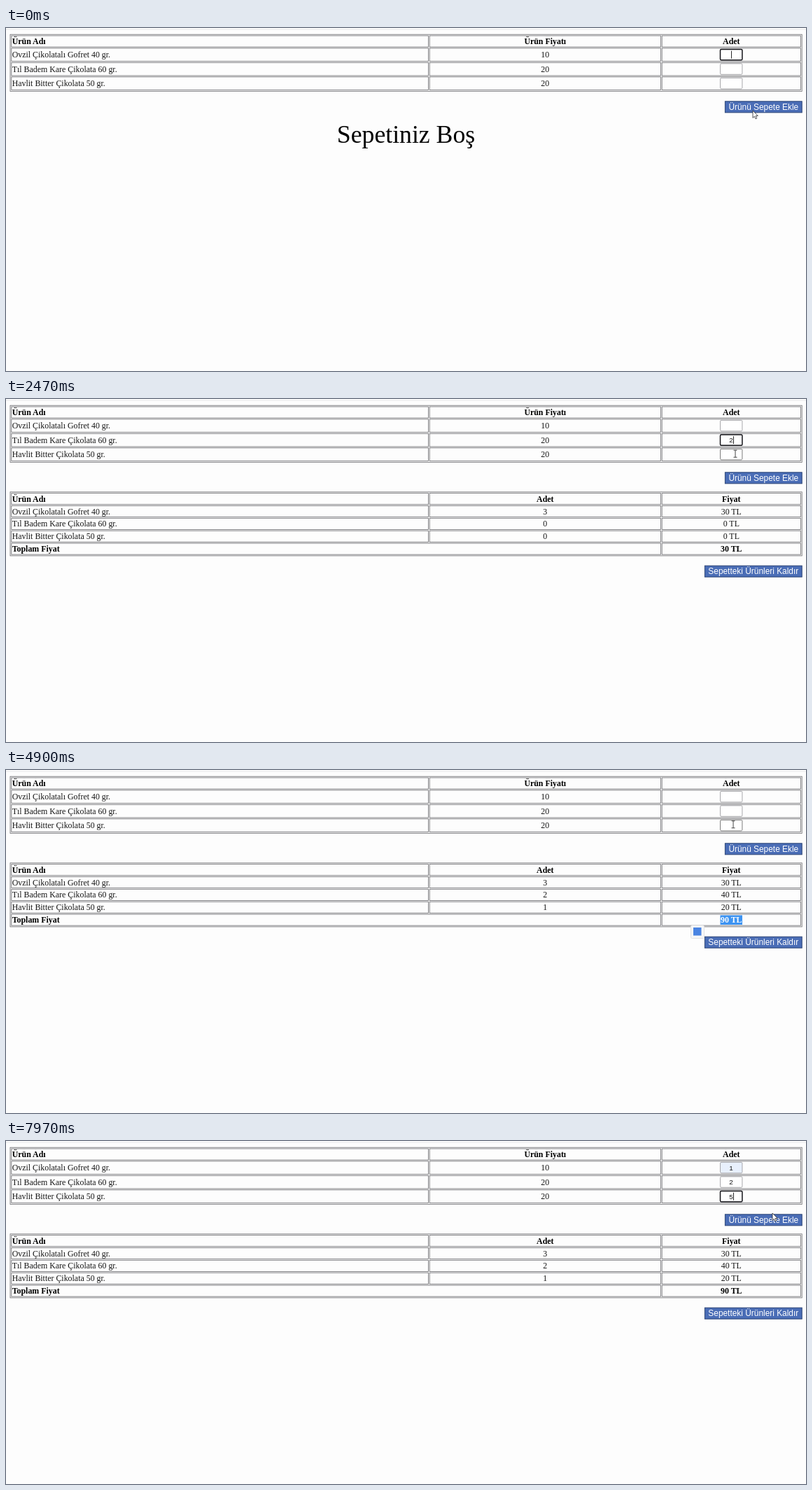
An HTML page for the animation above (8000 ms loop, 1143 px wide and 490 px high).

```html
<!DOCTYPE html>
<html lang="tr">
<head>
<meta charset="utf-8">
<title>Sepet</title>
<style>
  html, body { margin: 0; width: 100%; height: 100%; overflow: hidden; background: #fdfdfd; }
  svg { display: block; width: 1143px; height: 490px; }
  text { font: 11.9px "Liberation Serif", "Times New Roman", serif; fill: #161616; }
  .bold { font-weight: bold; fill: #000; }
  .mid { text-anchor: middle; }
  .title { font-size: 35.7px; fill: #000; }
  .label { font: 11.9px "Liberation Sans", Arial, sans-serif; fill: #fff; }
  .digit { font: 9.9px "Liberation Sans", Arial, sans-serif; }
  .line { fill: none; stroke: #68686c; stroke-width: .8; }
  .button { fill: #4a6db6; stroke: #2b4475; }
  .picked { font-weight: bold; fill: #fff; }
  .field { fill: #fff; stroke: #98989c; stroke-width: .85; }
  .field.over { stroke: #666; }
  .field.focus { stroke: #15151a; stroke-width: 1.5; }
  .field.autofill { fill: #e8f0fd; }
</style>
</head>
<body>
<svg id="stage" viewBox="0 0 1143 490"></svg>
<script>
const LOOP = 8000, BLINK = 540, MOVE = 260;
const LEFT = 6, RIGHT = 1137.2, GAP = 1.8;
const ROW = 17.87, FIELD_ROW = 20.5;
const stage = document.getElementById('stage');

function add(parent, tag, attrs = {}, content = '') {
  const node = document.createElementNS('http://www.w3.org/2000/svg', tag);
  set(node, attrs);
  node.textContent = content;
  return parent.appendChild(node);
}
function set(node, attrs) {
  for (const key in attrs) node.setAttribute(key, attrs[key]);
}
const show = (node, on) => set(node, { visibility: on ? 'inherit' : 'hidden' });
const text = (parent, x, y, content, cls = '') => add(parent, 'text', { x, y, class: cls }, content);
const box = (parent, x, y, width, height, attrs) =>
  add(parent, 'rect', { x, y, width, height, ...attrs });
const line = { class: 'line' };

const products = [
  { name: 'Ovzil Çikolatalı Gofret 40 gr.', price: 10 },
  { name: 'Tıl Badem Kare Çikolata 60 gr.', price: 20 },
  { name: 'Havlit Bitter Çikolata 50 gr.', price: 20 }
];

// Draws a bordered table; a null cell joins the one before it
function table(parent, top, bodyRow, rows) {
  const edges = [LEFT + GAP, 605.2, 937.2, RIGHT];
  let y = top + GAP;
  const drawn = rows.map((cells, r) => {
    const pitch = r ? bodyRow : ROW, height = pitch - GAP;
    const cls = r && cells[1] !== null ? '' : 'bold';
    const labels = cells.map((cell, c) => {
      if (cell === null) return null;
      const end = edges[cells[c + 1] === null ? c + 2 : c + 1] - GAP;
      box(parent, edges[c], y, end - edges[c], height, line);
      const x = c ? (edges[c] + end) / 2 : edges[c] + .9;
      return text(parent, x, y + height / 2 + 4, cell, c ? cls + ' mid' : cls);
    });
    y += pitch;
    return labels;
  });
  box(parent, LEFT, top, RIGHT - LEFT, y - top, line);
  return drawn;
}

function button(parent, x, y, label) {
  box(parent, x, y, RIGHT - x, 16, { class: 'button' });
  text(parent, (x + RIGHT) / 2, y + 12.2, label, 'label mid');
}

box(stage, 0, 1.6, 1143, .9, { fill: '#e6e6e8' });
table(stage, 9.2, FIELD_ROW, [
  ['Ürün Adı', 'Ürün Fiyatı', 'Adet'],
  ...products.map(({ name, price }) => [name, price, ''])
]);
const fields = products.map((_, i) => {
  const y = 38.1 + FIELD_ROW * i;
  return {
    y,
    frame: box(stage, 1020.5, y - 7.7, 31.4, 15.4, { rx: 1.5 }),
    digit: text(stage, 1036, y + 3.6, '', 'digit mid')
  };
});
const caret = box(stage, 0, 0, .9, 11, { fill: '#111' });
button(stage, 1027.4, 104.8, 'Ürünü Sepete Ekle');
const empty = text(stage, 571.5, 164.4, 'Sepetiniz Boş', 'title mid');

const basket = add(stage, 'g');
const basketRows = table(basket, 132.8, ROW, [
  ['Ürün Adı', 'Adet', 'Fiyat'],
  ...products.map(({ name }) => [name, '', '']),
  ['Toplam Fiyat', null, '']
]).slice(1);
button(basket, 998.4, 238.2, 'Sepetteki Ürünleri Kaldır');

// Selected total, revealed from the right
const clip = add(stage, 'clipPath', { id: 'selection' });
const clipBox = box(clip, 0, 207, 0, 15);
const selected = add(stage, 'g', { 'clip-path': 'url(#selection)' });
box(selected, 1020.5, 207.5, 31.5, 13.5, { fill: '#3c93f2' });
const selectedTotal = text(selected, 1036.3, 218.1, '', 'picked mid');
const popup = add(stage, 'g');
box(popup, 978.5, 222, 19, 18.5, { rx: 2, fill: '#f7f7f8', stroke: '#e2e2e4' });
box(popup, 982, 225, 11.5, 11.5, { fill: '#4a84e2' });

const arrow = add(stage, 'path', {
  d: 'M0 0V10.4L2.4 8.2 4 11.8 5.8 11 4.2 7.5H7.3Z',
  fill: '#fff', stroke: '#2a2a2e', 'stroke-width': .8
});
const beam = add(stage, 'path', {
  d: 'M-2.5 -5H2.5M0 -5V5M-2.5 5H2.5',
  fill: 'none', stroke: '#333', 'stroke-width': .9
});

// What the user does; a move ends at its time
const inField = (i, x = 1042) => [x, fields[i].y - .8];
const script = [
  { at: 120, type: 3 },
  { at: 500, submit: true },
  { at: 1100, to: [1118, 104] },
  { at: 1650, to: inField(1, 1045) },
  { at: 1750, click: 1 },
  { at: 2130, type: 2 },
  { at: 2480, to: inField(2), click: 2 },
  { at: 2680, type: 1 },
  { at: 3220, to: [1104, 110] },
  { at: 3430, submit: true },
  { at: 4120, to: [1056, 214] },
  { at: 4540, to: [991, 225], drag: true },
  { at: 4890, to: inField(2, 1039) },
  { at: 5060, to: inField(0), click: 0 },
  { at: 5150, type: 1 },
  { at: 5690, to: [1085, 58] },
  { at: 6110, to: inField(1), click: 1 },
  { at: 6440, type: 2 },
  { at: 6890, to: [1096, 106] },
  { at: 7170, to: inField(2), click: 2 },
  { at: 7770, type: 5 },
  { at: 7960, to: [1095, 103] }
];

const ease = u => u * u * (3 - 2 * u);

// Replays the script up to time t
function stateAt(t) {
  const state = {
    pos: [1067, 118], focus: 0, blinkFrom: 0, digits: ['', '', ''],
    counts: [0, 0, 0], filled: false, selecting: false, popup: false, dragging: false
  };
  let previous = 0;
  for (const step of script) {
    const start = step.to ? Math.max(previous, step.at - MOVE) : step.at;
    if (t < start) break;
    if (step.to) {
      const u = ease(Math.min(1, (t - start) / (step.at - start)));
      state.pos = state.pos.map((p, k) => p + (step.to[k] - p) * u);
      state.dragging = Boolean(step.drag);
    }
    if (step.drag) state.selecting = true;
    if (t < step.at) break;
    if (step.drag) state.popup = t > step.at + 100;
    if (step.type) state.digits[state.focus] = step.type;
    if (step.click >= 0) {
      state.focus = step.click;
      state.selecting = state.popup = false;
    }
    if (step.type || step.click >= 0) state.blinkFrom = step.at;
    if (step.submit) {
      state.counts = state.counts.map((count, i) => count + Number(state.digits[i]));
      state.digits.fill('');
      state.focus = -1;
      state.filled = true;
    }
    previous = step.at;
  }
  return state;
}

function drawFields({ pos: [x, y], focus, digits, blinkFrom }, t) {
  const over = fields.findIndex(field => Math.abs(x - 1036) < 16 && Math.abs(y - field.y) < 8);
  fields.forEach((field, i) => {
    const autofill = i === 0 && digits[i] && focus !== i;
    const cls = [
      'field', i === over && 'over', i === focus && 'focus', autofill && 'autofill'
    ].filter(Boolean).join(' ');
    set(field.frame, { class: cls });
    field.digit.textContent = digits[i];
  });
  show(caret, focus >= 0 && (t - blinkFrom) % (2 * BLINK) < BLINK);
  if (focus >= 0) set(caret, { x: digits[focus] ? 1039.1 : 1036, y: fields[focus].y - 5.4 });
  return over >= 0;
}

function drawBasket({ counts, filled }) {
  show(empty, !filled);
  show(basket, filled);
  const prices = counts.map((count, i) => count * products[i].price);
  counts.forEach((count, i) => {
    basketRows[i][1].textContent = count;
    basketRows[i][2].textContent = prices[i] + ' TL';
  });
  const total = prices.reduce((a, b) => a + b) + ' TL';
  basketRows[products.length][2].textContent = selectedTotal.textContent = total;
}

function draw(t) {
  const state = stateAt(t), [x, y] = state.pos;
  const overField = drawFields(state, t);
  drawBasket(state);

  const left = state.dragging ? Math.min(1052, x) : 1020;
  set(clipBox, { x: left, width: 1052 - left });
  show(selected, state.selecting);
  show(popup, state.popup);

  const textual = overField || state.dragging;
  show(arrow, !textual);
  show(beam, textual);
  set(textual ? beam : arrow, { transform: `translate(${x} ${y})` });
}

function tick() {
  draw(performance.now() % LOOP);
  requestAnimationFrame(tick);
}
tick();
</script>
</body>
</html>
```
